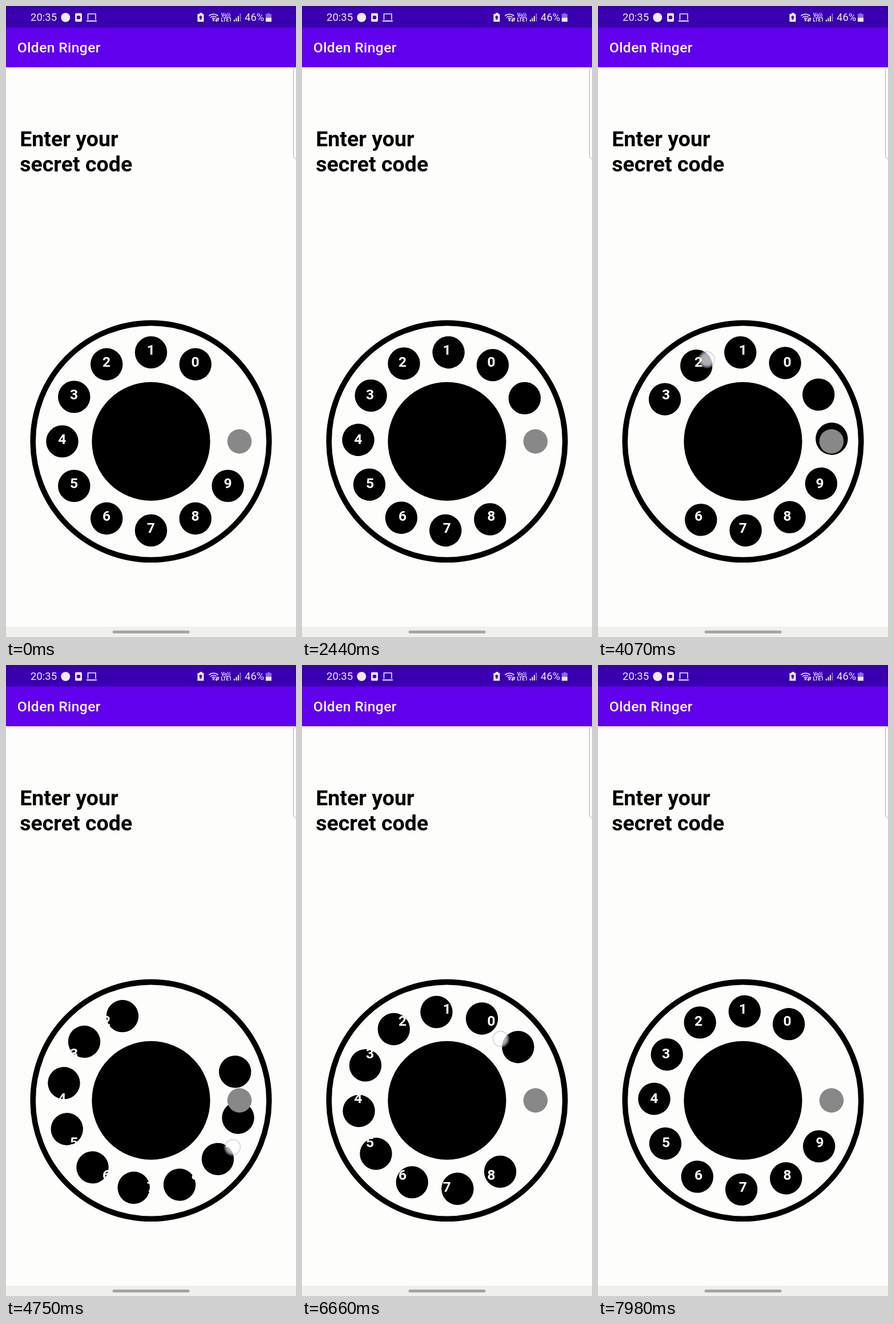
Animation, 508 px wide and 1102 px high, one loop 8 s. Source, as an HTML page:

```html
<!DOCTYPE html>
<html lang="en">
<head>
<meta charset="utf-8">
<title>Olden Ringer</title>
<style>
  html, body { margin: 0; width: 100%; height: 100%; overflow: hidden; background: #fdfdfb; }
  svg { display: block; width: 100vw; height: 100vh; font-family: Roboto, sans-serif; }
  .status { fill: #f1ebfa; font-size: 18.5px; }
  .tiny { fill: #f1ebfa; font-size: 8.6px; font-weight: 700; }
  .title { fill: #fff; font-size: 24.7px; font-weight: 500; letter-spacing: .35px; }
  .prompt { font-size: 37.5px; font-weight: 700; }
  .digits { fill: #fdfdfb; font-size: 24.7px; font-weight: 700; text-anchor: middle; }
  .line { fill: none; stroke: #f1ebfa; stroke-width: 1.6; }
</style>
</head>
<body>
<svg viewBox="0 0 508 1102">
  <defs>
    <radialGradient id="glow">
      <stop offset="0" stop-color="#fff" stop-opacity=".7"/>
      <stop offset=".6" stop-color="#fff" stop-opacity=".68"/>
      <stop offset=".8" stop-color="#fff" stop-opacity=".35"/>
      <stop offset="1" stop-color="#fff" stop-opacity="0"/>
    </radialGradient>
  </defs>

  <rect width="508" height="1102" fill="#fdfdfb"/>
  <rect width="508" height="38" fill="#3a00b0"/>
  <rect y="37.5" width="508" height="69.5" fill="#6000ec"/>

  <!-- status bar -->
  <text class="status" x="43" y="26.3">20:35</text>
  <g fill="#f1ebfa">
    <circle cx="104.3" cy="20" r="8"/>
    <rect x="121" y="12.5" width="12" height="15" rx="2"/>
    <circle cx="127" cy="20" r="3.3" fill="#3a00b0"/>
    <path d="M141 25.2h18v2h-18z"/>
    <path d="M339 12h5v2h2.5v13.5h-11V14h3.5z"/>
    <path d="M341 16.5l3.6 3.6h-2v3.6h-3.2v-3.6h-2z" fill="#3a00b0"/>
    <circle cx="363.5" cy="25" r="1.7"/>
    <path d="M399 24h2v3h-2zM402.5 21h2v6h-2zM406 17.5h2v9.5h-2z"/>
    <path d="M409.5 13h2v14h-2z" opacity=".45"/>
    <path d="M458 12.5h4v1.5h3v6.5h-10V14h3z" opacity=".45"/>
    <path d="M455 20.5h10v7h-10z"/>
  </g>
  <path class="line" d="M143.5 24V13.8h13.5V24M355.5 17.3a12 12 0 0 1 16 0M358.2 20a8 8 0 0 1 10.6 0M360.8 22.6a4 4 0 0 1 5.4 0"/>
  <path class="line" d="M368.5 21.5v5M371.5 21.5v5M367 25l1.5 1.8 1.5-1.8M370 23l1.5-1.8 1.5 1.8"/>
  <text class="tiny" x="377" y="18.8">Vo))</text>
  <text class="tiny" x="376.5" y="27.3">LTE1</text>
  <text class="status" x="418" y="26.3">46%</text>

  <text class="title" x="19.8" y="81">Olden Ringer</text>
  <text class="prompt" x="24.2" y="245">Enter your<tspan x="24.2" y="289">secret code</tspan></text>
  <rect x="503.5" y="107" width="20" height="160.5" rx="6" fill="#fcfcfc" stroke="#aaa"/>

  <!-- dial -->
  <g transform="translate(254 760.4)">
    <circle r="206.8" fill="none" stroke="#000" stroke-width="9.6"/>
    <g id="wheel"></g>
    <circle r="103.6"/>
    <circle cx="155" r="21.3" fill="#888"/>
    <g id="digits" class="digits"></g>
    <g id="finger">
      <circle r="16.5" fill="url(#glow)"/>
      <circle r="13.3" fill="none" stroke="#8888d8" stroke-opacity=".4" stroke-width="1.5"/>
    </g>
  </g>

  <rect y="1084" width="508" height="18" fill="#f0f0ed"/>
  <rect x="186.5" y="1090.7" width="135" height="5" rx="2.5" fill="#a3a3a3"/>
</svg>
<script>
  const LOOP = 8000;
  const ORBIT = 155.5;
  const RETURN_MS = 1000;
  const LEAD = 29.6;   // degrees the finger gains on the wheel during a drag
  const DRIFT = 23.2;  // pixels the finger slides outwards during a drag
  const NS = "http://www.w3.org/2000/svg";
  const $ = id => document.getElementById(id);

  // A drag turns the wheel from `from` to `peak` degrees; let go, it eases to `home`.
  const turns = [
    { down: 1070, up: 1650, from: 0, peak: 66, home: 30, power: 1.26, grip: -64, radius: 159 },
    { down: 2950, up: 4870, from: 30, peak: 336.6, home: 0, power: 1.35, grip: 50.7, radius: 143 },
    { down: 6430, up: 7120, from: 0, peak: 92, home: 0, power: 1.26, grip: -82, radius: 135 }
  ];

  const mix = (a, b, p) => a + (b - a) * p;

  function polar(deg, r) {
    const a = deg * Math.PI / 180;
    return [r * Math.cos(a), r * Math.sin(a)];
  }

  // cubic-bezier(.4, 0, .2, 1), solved by bisection
  function ease(x) {
    let lo = 0, hi = 1;
    for (let i = 0; i < 20; i++) {
      const s = (lo + hi) / 2, q = 1 - s;
      if (1.2 * q * q * s + 0.6 * q * s * s + s * s * s < x) lo = s;
      else hi = s;
    }
    return lo * lo * (3 - 2 * lo);
  }

  function add(parent, tag, attrs) {
    const el = document.createElementNS(NS, tag);
    for (const name in attrs) el.setAttribute(name, attrs[name]);
    return parent.appendChild(el);
  }

  for (let d = 0; d < 10; d++) {
    const [x, y] = polar(-60 - 30 * d, ORBIT);
    add($("wheel"), "circle", { cx: x, cy: y, r: 28.2 });
    add($("digits"), "text", { x: x - 0.2, y: y + 4.3 }).textContent = d;
  }

  function draw(t) {
    const turn = turns.findLast(k => t >= k.down);
    const held = turn && t < turn.up;
    let angle = 0;
    if (held) {
      const u = (t - turn.down) / (turn.up - turn.down);
      angle = mix(turn.from, turn.peak, u ** turn.power);
      const place = polar(angle + turn.grip + LEAD * u, turn.radius + DRIFT * u);
      $("finger").setAttribute("transform", `translate(${place})`);
    } else if (turn) {
      angle = mix(turn.peak, turn.home, ease(Math.min(1, (t - turn.up) / RETURN_MS)));
    }
    $("wheel").setAttribute("transform", `rotate(${angle})`);
    $("finger").setAttribute("visibility", held ? "visible" : "hidden");
  }

  const start = performance.now();
  function tick() {
    draw((performance.now() - start) % LOOP);
    requestAnimationFrame(tick);
  }
  tick();
</script>
</body>
</html>
```
